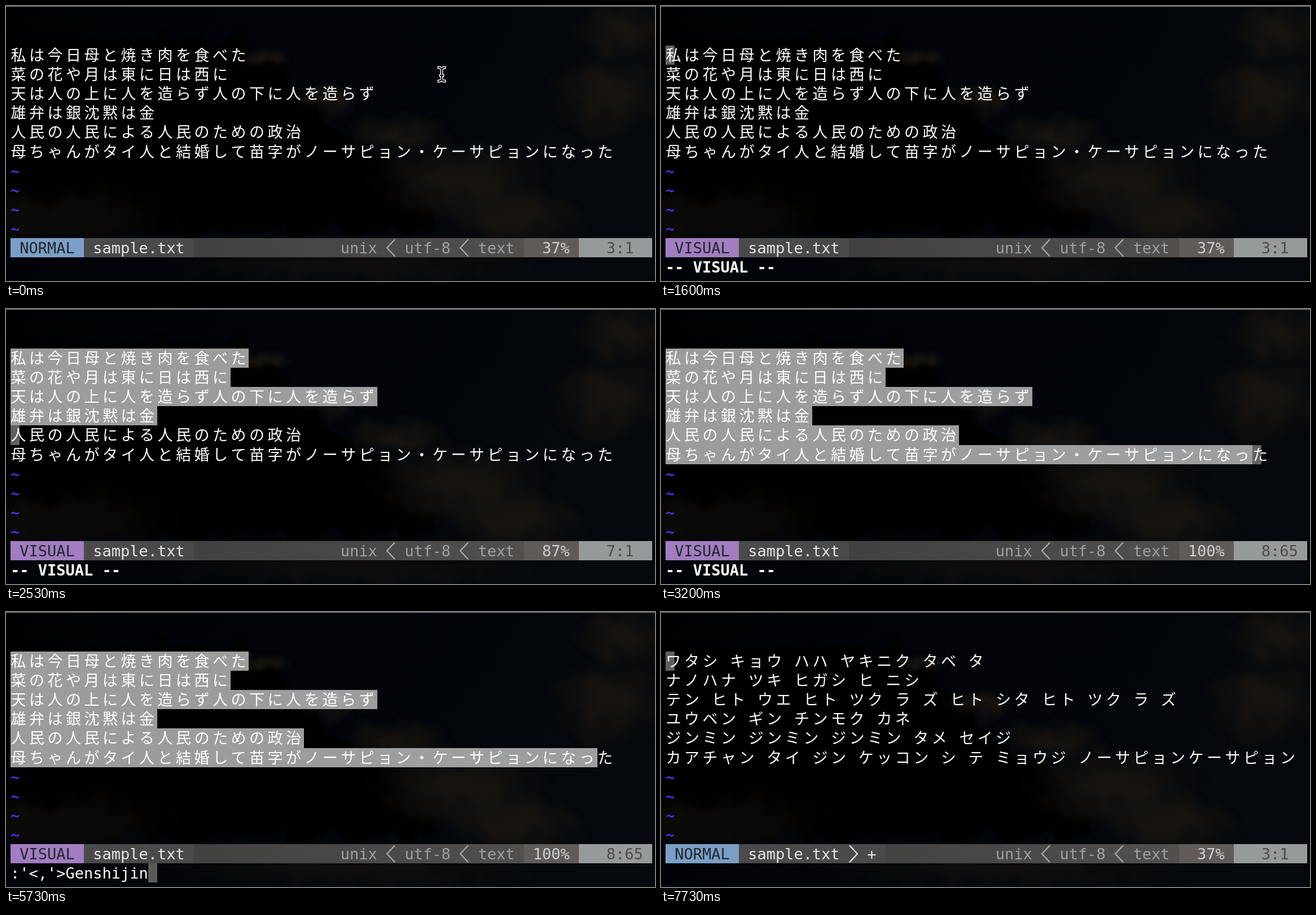
Write an HTML page that moves like this. It is 1150x487 px and loops after 8 s.

```html
<!DOCTYPE html>
<html lang="ja">
<head>
<meta charset="utf-8">
<title>Editor session</title>
<style>
  html, body { margin: 0; width: 100%; height: 100%; overflow: hidden; background: #000; }
  svg { position: absolute; left: 0; top: 0; width: 1150px; height: 487px; }
  text { font: 27px "DejaVu Sans Mono", "Noto Sans CJK JP", "Noto Sans CJK", monospace; fill: #fff; }
  .ja { font-family: "Noto Sans CJK JP", "Noto Sans CJK", sans-serif; }
  .bold { font-weight: bold; }
  .tilde { fill: #4a2fe0; font-weight: bold; }
  .dark { fill: #23262b; }
  .soft { fill: #e6e6e6; }
  .info { fill: #a0a0a0; }
  .pct { fill: #cfcfcf; }
  .pos { fill: #4b4b4b; }
  .sep { fill: none; stroke: #a8a8a8; stroke-width: 2.3; }
  .sep.soft { fill: none; stroke: #e6e6e6; }
  rect { shape-rendering: crispEdges; }
</style>
</head>
<body>
<svg viewBox="0 0 1150 487" aria-hidden="true">
  <defs>
    <linearGradient id="sky" x1="0" y1="0" x2="1" y2="0.3">
      <stop offset="0" stop-color="#010102"/>
      <stop offset=".35" stop-color="#02040a"/>
      <stop offset=".75" stop-color="#03060b"/>
      <stop offset="1" stop-color="#05090d"/>
    </linearGradient>
    <linearGradient id="bar">
      <stop offset="0" stop-color="#3d3d3d"/>
      <stop offset="1" stop-color="#524f4d"/>
    </linearGradient>
    <radialGradient id="puff">
      <stop offset=".3" stop-color="#17130f"/>
      <stop offset="1" stop-color="#17130f" stop-opacity="0"/>
    </radialGradient>
    <filter id="cloud" x="-20%" y="-20%" width="140%" height="140%" color-interpolation-filters="sRGB">
      <feTurbulence type="fractalNoise" baseFrequency=".02" numOctaves="4" seed="7"/>
      <feDisplacementMap in="SourceGraphic" scale="60" xChannelSelector="R" yChannelSelector="G"/>
      <feGaussianBlur stdDeviation="4"/>
    </filter>
  </defs>
  <rect width="1150" height="487" fill="url(#sky)"/>
  <g filter="url(#cloud)">
    <path fill="#000" d="M0 60H420L560 200 720 300 760 400H0Z"/>
    <g fill="url(#puff)">
      <ellipse cx="1095" cy="40" rx="95" ry="60"/>
      <ellipse cx="1070" cy="160" rx="110" ry="75"/>
      <ellipse cx="460" cy="90" rx="45" ry="25"/>
      <ellipse cx="560" cy="165" rx="70" ry="25"/>
      <ellipse cx="690" cy="225" rx="95" ry="35"/>
      <ellipse cx="800" cy="310" rx="160" ry="75"/>
      <ellipse cx="900" cy="375" rx="120" ry="65"/>
    </g>
    <g fill="url(#puff)" opacity=".55">
      <ellipse cx="90" cy="375" rx="230" ry="55"/>
      <ellipse cx="600" cy="460" rx="360" ry="45"/>
    </g>
  </g>
  <rect width="1150" height="1" fill="#777"/>
  <rect y="1" width="1150" height="1" fill="#2a2a2c"/>
  <path d="M0 478V487H9Q1 486 0 478ZM1150 478V487H1141Q1149 486 1150 478Z" fill="#000"/>
</svg>
<svg id="screen" viewBox="0 0 1150 487"></svg>

<script>
const LOOP = 8000, CELL = 16.243, LEFT = 8;
const STATUS = 12, COMMAND = 13;
const colX = c => LEFT + CELL * c;
const rowY = r => 2.1 + 34.06 * r;
const screen = document.getElementById('screen');

const before = [
  '私は今日母と焼き肉を食べた',
  '菜の花や月は東に日は西に',
  '天は人の上に人を造らず人の下に人を造らず',
  '雄弁は銀沈黙は金',
  '人民の人民による人民のための政治',
  '母ちゃんがタイ人と結婚して苗字がノーサピョン・ケーサピョンになった'
];
const after = [
  'ワタシ キョウ ハハ ヤキニク タベ タ',
  'ナノハナ ツキ ヒガシ ヒ ニシ',
  'テン ヒト ウエ ヒト ツク ラ ズ ヒト シタ ヒト ツク ラ ズ',
  'ユウベン ギン チンモク カネ',
  'ジンミン ジンミン ジンミン タメ セイジ',
  'カアチャン タイ ジン ケッコン シ テ ミョウジ ノーサピョンケーサピョン'
];

// Cursor jumps: start time, file line, column
const moves = [
  [0, 3, 1], [1670, 4, 1], [2000, 5, 1], [2270, 6, 1],
  [2530, 7, 1], [2730, 8, 1], [3000, 8, 65], [7530, 3, 1]
];
const VISUAL = 1400, PROMPT = 4530, TYPE = 4800, KEY = 66, ENTER = 6330, DONE = 7530;

const escapeXml = s => s.replace(/&/g, '&amp;').replace(/</g, '&lt;').replace(/>/g, '&gt;');

// Puts every character on the terminal grid; wide ones take two cells.
function print(str, col, row, cls = '') {
  const xs = [...str].map(ch => {
    const wide = ch > '\u2fff';
    const x = (colX(col) + (wide ? 0.6 : 0)).toFixed(2);
    col += wide ? 2 : 1;
    return x;
  });
  return `<text class="${cls}" x="${xs.join(' ')}" y="${Math.round(rowY(row) + 27)}">${escapeXml(str)}</text>`;
}

function block(col, row, cells, fill) {
  const x = Math.round(colX(col)), y = Math.round(rowY(row));
  const w = Math.round(colX(col + cells)) - x, h = Math.round(rowY(row + 1)) - y;
  return `<rect x="${x}" y="${y}" width="${w}" height="${h}" fill="${fill}"/>`;
}

function chevron(col, dir, cls = '') {
  const x = colX(col) + CELL / 2, y = rowY(STATUS) + 17.5;
  return `<path class="sep ${cls}" d="M${x - 7 * dir} ${y - 15}L${x + 7 * dir} ${y}L${x - 7 * dir} ${y + 15}"/>`;
}

function stateAt(t) {
  const [, line, col] = moves.filter(m => m[0] <= t).pop();
  const done = t >= DONE, visual = t >= VISUAL && !done;
  const prompt = t >= PROMPT && !done;
  const typed = prompt ? Math.min(9, Math.max(0, Math.floor((t - TYPE) / KEY) + 1)) : 0;
  const command = prompt ? ":'<,'>" + 'Genshijin'.slice(0, typed) : '';
  const cursor = prompt ? t < ENTER : t >= VISUAL || (t >= 330 && t < 870);
  return { line, col, done, visual, prompt, command, cursor, pointer: t < VISUAL };
}

function selection(s) {
  let out = '';
  for (let line = 3; line <= s.line; line++) {
    const cells = line < s.line ? before[line - 3].length * 2 : s.col - 1;
    if (cells) out += block(0, line - 1, cells, 'rgba(208,208,208,.75)');
  }
  return out;
}

function statusBar(s) {
  const fileEnd = s.done ? 24 : 20;
  const percent = Math.floor(s.line * 100 / 8) + '%';
  return block(0, STATUS, 8, s.visual ? '#a17dc1' : '#7a9fc6')
    + block(8, STATUS, 48, 'url(#bar)')
    + block(8, STATUS, fileEnd - 8, '#4a4a4a')
    + block(56, STATUS, 6, '#605b58')
    + block(62, STATUS, 8, '#979a9b')
    + print(s.visual ? 'VISUAL' : 'NORMAL', 1, STATUS, 'dark')
    + print('sample.txt', 9, STATUS, 'soft')
    + (s.done ? chevron(20, 1, 'soft') + print('+', 22, STATUS, 'soft') : '')
    + print('unix', 36, STATUS, 'info') + chevron(41, -1)
    + print('utf-8', 43, STATUS, 'info') + chevron(49, -1)
    + print('text', 51, STATUS, 'info')
    + print(percent, 61 - percent.length, STATUS, 'pct')
    + print(`${s.line}:${s.col}`, 65, STATUS, 'pos');
}

function pointer() {
  const d = 'M767 109Q772 109 772 114V128Q772 133 767 133M777 109Q772 109 772 114M772 128Q772 133 777 133M770 123H774';
  const stroke = (color, width) =>
    `<path d="${d}" fill="none" stroke="${color}" stroke-width="${width}" stroke-linecap="square"/>`;
  return stroke('#f2f2f2', 5) + stroke('#080808', 2);
}

function draw(s) {
  let out = s.visual ? selection(s) : '';
  if (s.cursor) {
    out += s.prompt
      ? block(s.command.length, COMMAND, 1, '#5a5a5a')
      : block(s.col - 1, s.line - 1, 1, '#606060');
  }
  (s.done ? after : before).forEach((str, i) => out += print(str, 0, i + 2, 'ja'));
  for (let row = 8; row < STATUS; row++) out += print('~', 0, row, 'tilde');
  out += statusBar(s);
  if (s.prompt) out += print(s.command, 0, COMMAND);
  else if (s.visual) out += print('-- VISUAL --', 0, COMMAND, 'bold');
  if (s.pointer) out += pointer();
  return out;
}

let shown = '';
const start = performance.now();
function tick() {
  const state = stateAt((performance.now() - start) % LOOP);
  const key = JSON.stringify(state);
  if (key !== shown) {
    screen.innerHTML = draw(state);
    shown = key;
  }
  requestAnimationFrame(tick);
}
tick();
</script>
</body>
</html>
```
